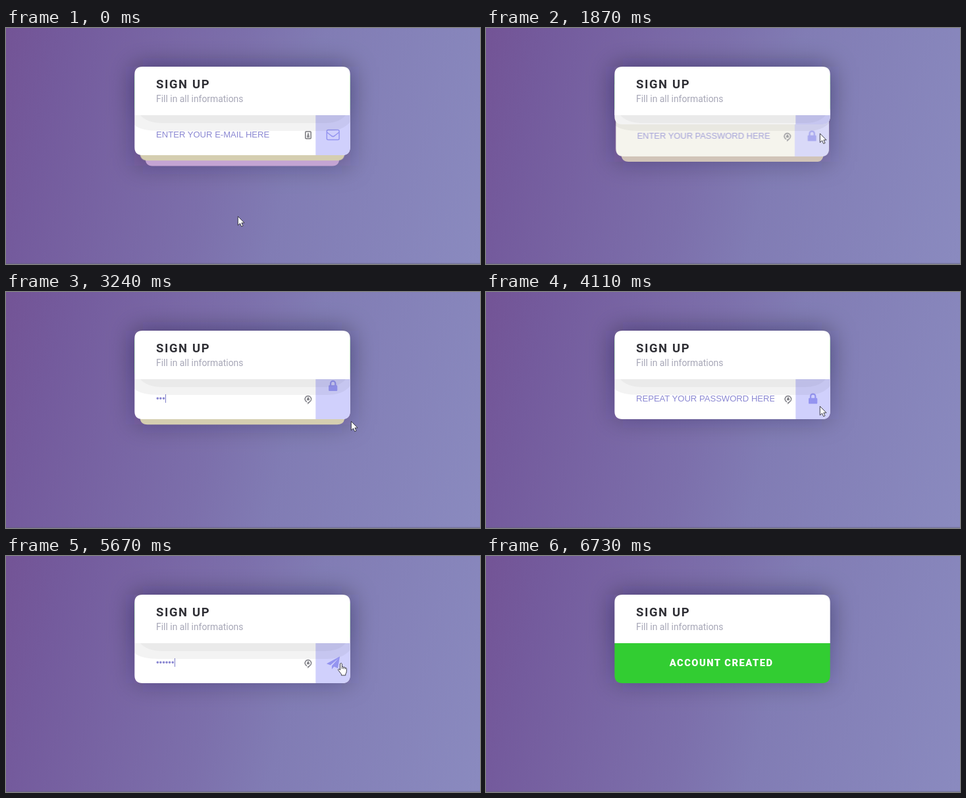
An HTML page for the animation above (7.43 s loop, 720 by 360 pixels).

```html
<!DOCTYPE html>
<html lang="en">
<head>
<meta charset="utf-8">
<title>Sign up</title>
<style>
html, body { margin: 0; width: 100%; height: 100%; overflow: hidden; }
svg { display: block; }
.field { font: 13.09px "Liberation Sans", Arial, sans-serif; fill: #8b88d2; }
.head { font-family: Roboto, sans-serif; }
.icon { fill: #9494f0; }
</style>
</head>
<body>
<svg id="stage" width="720" height="360" viewBox="0 0 720 360">
  <defs>
    <linearGradient id="bg" gradientUnits="userSpaceOnUse" x1="-18" y1="85" x2="738" y2="275">
      <stop offset="0" stop-color="#735496"/>
      <stop offset=".12" stop-color="#745b9d"/>
      <stop offset=".45" stop-color="#7c6fab"/>
      <stop offset=".6" stop-color="#817cb4"/>
      <stop offset="1" stop-color="#8a8abf"/>
    </linearGradient>
    <filter id="blur" filterUnits="userSpaceOnUse" x="80" y="-40" width="560" height="360">
      <feGaussianBlur stdDeviation="19"/>
    </filter>
    <path id="sheet" d="M195.3 133H522.7V182Q522.7 194 510.7 194H207.3Q195.3 194 195.3 182Z"/>
    <clipPath id="sheetClip"><use href="#sheet"/></clipPath>
    <clipPath id="fieldClip"><rect x="228" y="150" width="210" height="26"/></clipPath>
    <g id="mail" fill="none" stroke="#9494f0" stroke-width="1.5" stroke-linejoin="round">
      <rect x="-9.4" y="-7.4" width="18.8" height="15" rx="2"/>
      <path d="M-9.2-4C-6-1.5-3.5 .8-1.6 2Q0 3 1.6 2C3.5 .8 6-1.5 9.2-4"/>
    </g>
    <path id="up" class="icon" d="M0-8.5L9.2 .7L6.7 3.2L1.9-1.5V8.2H-1.9V-1.5L-6.7 3.2L-9.2 .7Z"/>
    <path id="lock" class="icon" fill-rule="evenodd" d="M-4.8-1.2V-3.6A4.8 5 0 0 1 4.8-3.6V-1.2H5.4Q6.6-1.2 6.6 0V6.4Q6.6 7.6 5.4 7.6H-5.4Q-6.6 7.6-6.6 6.4V0Q-6.6-1.2-5.4-1.2ZM-2.5-1.2H2.5V-3.6A2.5 2.7 0 0 0-2.5-3.6Z"/>
    <path id="plane" class="icon" d="M10.4-9.8L7.4 8.2L1.6 5.7L-1.8 9.8V4.4L8-6.6L-4 3.6L-9.8 1.2Z"/>
    <g id="card" stroke="#77777c" fill="none" stroke-width="1.5">
      <rect x="-4.2" y="-5.4" width="8.4" height="10.8" rx="1"/>
      <path d="M-2 2.8H2M-1.6 .6H1.6M0-3V0" stroke-width="1.6"/>
    </g>
    <g id="key">
      <path d="M-1.8 4.4A4.7 4.7 0 1 1 2.6 3.9L0 6.4V4.7" fill="none" stroke="#85858c" stroke-width="1.6"/>
      <path d="M-2-.8H2V1.9H-2ZM-1.2-.8V-1.6A1.2 1.2 0 0 1 1.2-1.6V-.8" fill="#85858c"/>
    </g>
  </defs>
  <rect width="720" height="360" fill="url(#bg)"/>
  <rect y="358.6" width="720" height="1.4" fill="#62627a" opacity=".5"/>
  <g fill="#17122a" filter="url(#blur)">
    <rect id="shadow" x="195" y="59" width="328" opacity=".3"/>
    <rect x="195" y="59" width="328" height="74" opacity=".2"/>
  </g>
  <g id="panels"></g>
  <g clip-path="url(#sheetClip)">
    <path d="M195 133H523V143Q512 157 488 157H232Q206 157 195 148Z" opacity=".047"/>
    <path d="M204 133H516Q506 145 486 145H238Q214 145 204 133Z" opacity=".038"/>
  </g>
  <g id="done">
    <use href="#sheet" fill="#32cd32"/>
    <text class="head" x="278.7" y="168" font-size="14.7" font-weight="900" letter-spacing="1.5" fill="#fff">ACCOUNT CREATED</text>
  </g>
  <path d="M195.3 133V71Q195.3 59 207.3 59H510.7Q522.7 59 522.7 71V133Z" fill="#fff"/>
  <g class="head">
    <text x="228" y="92.3" font-size="18.4" font-weight="700" letter-spacing="1.64" fill="#2f2f35">SIGN UP</text>
    <text x="228" y="113" font-size="13.9" fill="#a6a6b6">Fill in all informations</text>
  </g>
  <g id="cursor" stroke-linejoin="round">
    <path d="M.3 .3V14L3.5 11L5.7 15.8L8 14.8L5.9 10.2H10Z" fill="#fff" stroke="#2b2b35" stroke-width=".9"/>
    <path d="M3.6 1.3Q5.4-.6 6.4 1.6V6Q8.3 5.2 8.8 6.7Q10.8 6 11.2 7.7Q13.4 7.2 13.3 9.2V12.6Q13.2 15.6 11.8 17V19H5.4V17.2L1 11.6Q-.2 9.6 1.5 9.4L3.6 10.8ZM6.4 6V9M8.8 6.7V9.3M11.2 7.7V9.6" fill="#fff" stroke="#2b2b35" stroke-width=".9"/>
    <path d="M-2.5-7.5Q0-7.5 0-6Q0-7.5 2.5-7.5M0-6V6M-2.5 7.5Q0 7.5 0 6Q0 7.5 2.5 7.5" fill="none" stroke="#33333c"/>
  </g>
</svg>
<script>
const LOOP = 7430;
const SPANS = [[120, 1050], [1180, 2140], [2390, 3360], [3510, 4520], [4670, 5670], [5820, 6730]];
const FOLDS = [1590, 3660, 5850];
const PANELS = [
  { hint: "ENTER YOUR E-MAIL HERE", typed: "asd", focus: 510, keys: 770, gap: 130, next: 1040, icons: ["mail", "up"], mark: "card" },
  { hint: "ENTER YOUR PASSWORD HERE", typed: "•••", focus: 2780, keys: 2900, gap: 110, next: 3140, icons: ["lock", "up"], mark: "key" },
  { hint: "REPEAT YOUR PASSWORD HERE", typed: "••••••", focus: 4800, keys: 4930, gap: 70, next: 5180, icons: ["lock", "plane"], mark: "key" }
];
const TINTS = [[255, 255, 255], [213, 206, 176], [196, 164, 211]];
const ARROW = 0, HAND = 1, BEAM = 2;
// time, x, y, shape
const PATH = [
  [0, 352, 287, ARROW], [120, 350, 268, ARROW], [370, 342, 166, BEAM], [770, 350, 166, BEAM],
  [900, 420, 176, BEAM], [1040, 509, 186, ARROW], [1180, 530, 193, ARROW], [1440, 506, 165, HAND],
  [1720, 506, 161, ARROW], [2140, 509, 160, ARROW], [2380, 470, 163, BEAM], [2660, 372, 164, BEAM],
  [2900, 385, 166, BEAM], [3050, 470, 184, ARROW], [3221, 524, 197, ARROW], [3360, 534, 197, ARROW],
  [3510, 520, 184, ARROW], [3640, 504, 173, HAND], [3800, 506, 174, ARROW], [4087, 507, 174, ARROW],
  [4220, 490, 170, ARROW], [4370, 450, 167, BEAM], [4670, 370, 166, BEAM], [5000, 375, 168, BEAM],
  [5150, 440, 177, BEAM], [5300, 512, 182, HAND], [5670, 504, 163, HAND], [5940, 505, 164, ARROW],
  [6200, 530, 205, ARROW], [6600, 597, 310, ARROW]
];

const $ = id => document.getElementById(id);
const clamp = v => Math.max(0, Math.min(1, v));
const ease = (t, start, length) => {
  const u = clamp((t - start) / length);
  return u * u * (3 - 2 * u);
};
const mix = (a, b, u) => a + (b - a) * u;

$("panels").innerHTML = PANELS.map((p, i) => `
  <g id="panel${i}">
    <use href="#sheet"/>
    <g class="content" clip-path="url(#sheetClip)">
      <rect x="470.3" y="133" width="54" height="61" fill="#d0d0fc"/>
      <g class="reel">
        <use href="#${p.icons[0]}" x="496.7" y="163"/>
        <use href="#${p.icons[1]}" x="496.7" y="224"/>
      </g>
      <use href="#${p.mark}" x="459" y="163.3"/>
      <g clip-path="url(#fieldClip)">
        <text class="field" x="228" y="167"></text>
        <path class="caret" stroke="#7f7fca" stroke-width="1"/>
      </g>
    </g>
  </g>`).reverse().join("");

const views = PANELS.map((p, i) => {
  const root = $("panel" + i), find = s => root.querySelector(s);
  return { root, sheet: find("use"), content: find(".content"), reel: find(".reel"), text: find("text"), caret: find(".caret") };
});
const shapes = [...$("cursor").children];

function snap(t) {
  let held = 0;
  for (const [a, b] of SPANS) {
    const step = (b - a) / 7;
    if (t >= a) held = a + step * Math.min(7, Math.floor((t - a) / step + 1e-6));
  }
  return held;
}

// Level 0 is the open panel, 1 and 2 lie below it, -1 is hidden behind the header
function drawPanel(i, level, t) {
  const p = PANELS[i], v = views[i];
  const folded = Math.max(0, level);
  const scale = 1 - 0.05 * folded;
  const y = level > 0 ? 8.2 * level : 61 * level;
  v.root.setAttribute("transform", `translate(${359 * (1 - scale)} ${y}) scale(${scale} 1)`);
  v.root.setAttribute("visibility", level > -1 ? "visible" : "hidden");

  const k = Math.min(1, Math.floor(folded));
  const tint = TINTS[k].map((c, n) => Math.round(mix(c, TINTS[k + 1][n], folded - k)));
  v.sheet.setAttribute("fill", `rgb(${tint})`);
  v.content.setAttribute("opacity", clamp(1 - folded));

  const count = t < p.keys ? 0 : Math.min(p.typed.length, 1 + Math.floor((t - p.keys) / p.gap));
  v.text.textContent = count ? p.typed.slice(0, count) : p.hint;
  const x = 228.5 + (count ? Math.ceil(v.text.getComputedTextLength()) : 0);
  v.caret.setAttribute("d", `M${x} 156V169`);
  v.caret.setAttribute("opacity", t >= p.focus ? 1 : 0);
  v.reel.setAttribute("transform", `translate(0 ${-61 * ease(t, p.next, 215)})`);
}

function drawCursor(t) {
  let n = 0;
  while (n < PATH.length - 1 && PATH[n + 1][0] <= t) n++;
  const a = PATH[n], b = PATH[Math.min(n + 1, PATH.length - 1)];
  const u = b === a ? 0 : (t - a[0]) / (b[0] - a[0]);
  $("cursor").setAttribute("transform", `translate(${mix(a[1], b[1], u)} ${mix(a[2], b[2], u)})`);
  $("cursor").setAttribute("opacity", t < 6729 ? 1 : 0);
  shapes.forEach((s, i) => s.setAttribute("opacity", i === a[3] ? 1 : 0));
}

function draw(time) {
  const t = snap(time % LOOP);
  const folds = FOLDS.map(start => ease(t, start, 400));
  const gone = folds[0] + folds[1] + folds[2];
  PANELS.forEach((p, i) => drawPanel(i, Math.max(-1, i - gone), t));
  $("shadow").setAttribute("height", 135 + 8.2 * Math.max(0, 2 - gone));
  $("done").setAttribute("transform", `translate(0 ${-61 * (1 - folds[2])})`);
  drawCursor(t);
}

const begin = performance.now();
function tick() {
  draw(performance.now() - begin);
  requestAnimationFrame(tick);
}
tick();
</script>
</body>
</html>
```
